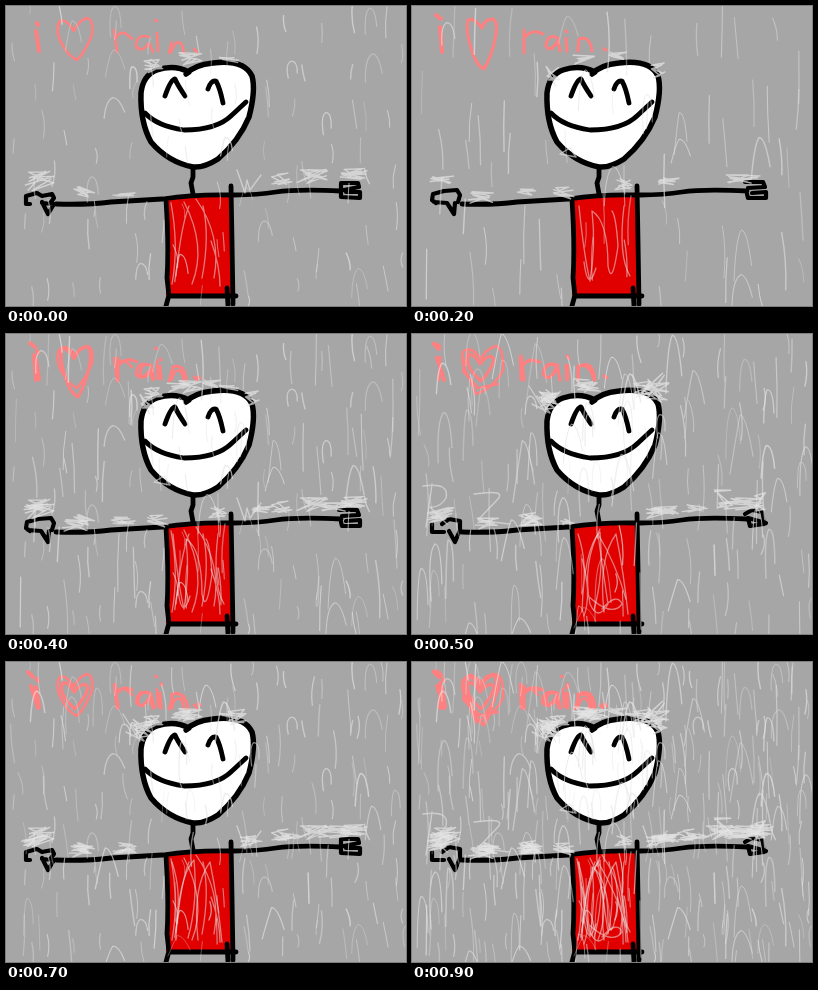
An HTML page with a canvas for the animation above (1 s loop, 400 by 300 pixels).

```html
<!DOCTYPE html>
<html lang="en">
<head>
<meta charset="utf-8">
<title>i love rain</title>
<style>
html, body { margin: 0; width: 100%; height: 100%; overflow: hidden; background: #a6a6a6; }
canvas { display: block; width: 400px; height: 300px; }
</style>
</head>
<body>
<canvas id="stage" width="400" height="300"></canvas>
<script>
const ctx = document.getElementById('stage').getContext('2d');
ctx.lineCap = ctx.lineJoin = 'round';

// Each sheet is one hand-drawn take of lettering, rain and splashes.
const sheets = [
  {
    seed: 11, cols: 15, rows: 7, min: 12, max: 31, arch: 0.12, penI: 4, pen: 2.6,
    dotted: 'M31 17l1 2M30 25L33 45',
    word: 'M68 25Q60 12 54 15Q48 24 56 38Q62 50 71 54Q79 46 86 29Q88 14 81 12Q73 14 68 25' +
      'M108 24L111 46M110 32Q115 21 126 33M143 31Q131 27 130 40Q135 48 143 37L147 46M149 14l2 1M151 27L152 45M163 47L166 36M165 46Q171 31 176 39L178 47M188 43l3 3',
    body: 'M165 197Q173 240 166 278M178 196Q201 240 186 278M190 193Q216 230 208 272M170 270Q175 220 183 200M196 272Q204 230 197 200M205 235Q214 260 214 280',
    extra: 'M231 164L239 187L241 174L244 184L255 169',
    splashes: [[148, 60, 20, 14], [184, 53, 25, 13], [222, 54, 25, 6], [33, 175, 32, 20], [78, 186, 22, 12], [119, 188, 24, 7], [276, 172, 22, 13], [307, 171, 32, 15], [346, 167, 30, 16]]
  },
  {
    seed: 29, cols: 15, rows: 6, min: 18, max: 42, arch: 0.2, penI: 4, pen: 3.2,
    dotted: 'M22 10L27 15M25 24L32 46',
    word: 'M68 30Q60 17 56 22Q53 33 69 47Q79 36 82 26Q79 17 68 30' +
      'M109 22L112 46M111 31Q117 23 126 28M144 31Q132 28 132 41Q138 49 145 32L148 46M155 22l1 1M154 31L155 46M166 46L166 32Q178 28 182 46M192 42l2 1',
    body: 'M170 278Q172 215 188 198Q192 240 182 276M192 278Q186 225 204 200Q212 240 216 280M166 200Q176 230 170 260',
    extra: 'M117 52L134 79M120 70L138 79L125 62',
    splashes: [[138, 66, 22, 22], [178, 53, 26, 10], [232, 55, 20, 16], [27, 179, 30, 14], [74, 190, 26, 12], [121, 186, 28, 11], [244, 179, 24, 12], [282, 174, 28, 9], [331, 169, 42, 14]]
  },
  {
    seed: 47, cols: 14, rows: 5, min: 22, max: 60, arch: 0.2, penI: 4, pen: 3,
    dotted: 'M24 9l5 4M28 21L30 46',
    word: 'M70 22Q61 11 56 14Q53 25 60 45Q64 59 72 63Q81 48 84 28Q86 14 80 13Q72 14 70 22' +
      'M112 24L112 47M112 32Q120 22 131 28M146 32Q135 27 134 40Q139 48 146 34L148 45M154 25l1 1M154 32L155 45M166 45L167 33Q178 29 180 45M192 43l2 1',
    body: 'M167 200Q172 250 178 275Q184 240 180 205Q196 215 196 260Q200 282 206 240Q204 210 200 205M212 200Q206 250 218 270M172 256Q176 288 184 262',
    extra: 'M148 148L164 151L158 142Z',
    splashes: [[141, 70, 14, 20], [172, 54, 22, 10], [206, 50, 20, 8], [246, 66, 14, 20], [29, 175, 25, 11], [69, 191, 26, 15], [115, 187, 22, 9], [151, 187, 22, 13], [212, 178, 20, 13], [257, 175, 22, 9], [331, 174, 34, 10]]
  },
  {
    seed: 83, cols: 15, rows: 5, min: 30, max: 66, arch: 0.5, penI: 2.8, pen: 2.6,
    dotted: 'M22 9l6 3M28 23L27 46',
    word: 'M69 25Q58 10 51 18Q48 29 58 46L64 60Q82 54 91 36Q92 15 84 12Q74 15 69 25M56 18L51 37L66 54L86 50' +
      'M108 23L109 46M109 33Q116 23 128 28M146 31Q132 26 131 40Q136 49 146 34L148 46M156 24l1 1M156 31L156 45M166 45L167 32Q181 25 183 45M193 43l2 1',
    body: 'M188 195Q170 230 178 270Q186 288 196 270Q190 230 186 200Q204 230 214 265M176 262Q200 284 210 270Q205 258 190 275M170 225Q180 260 172 282',
    extra: 'M20 150L14 193M11 152Q38 148 34 164Q28 174 18 173L35 190M62 160Q96 155 85 166L66 186L97 190',
    splashes: [[137, 64, 18, 23], [170, 50, 22, 12], [243, 55, 28, 32], [28, 184, 24, 12], [116, 185, 20, 13], [155, 188, 14, 7], [254, 176, 32, 10], [312, 165, 20, 20], [347, 167, 14, 20]]
  }
];

const steps = [[0], [1], [2], [3], [0, 2], [1, 3], [1, 2], [0, 1], [2, 3], [0, 1, 2, 3]];

const hands = [
  'M24 198L20 198L20 190L31 187L36 190L46 188L48 192L45 196M36 196L42 208L48 198L36 197M335 177L352 177L353 181L338 184M335 178L335 191L354 192L354 186L340 186',
  'M24 197L20 194L21 188L32 185L45 184L48 189L46 196M22 196L35 197L42 208L43 197M333 176L351 176L353 181L336 182M340 187L354 186L354 192L336 192L335 188',
  'M20 190L20 198L32 198M30 190L37 185L48 187L48 196L43 208L37 197M333 180L340 176L350 178L352 190L338 192L336 184L354 189'
];

const head = 'M180 68Q188 59 207 57Q238 53 246 70Q250 84 243 111Q233 135 212 153Q198 162 187 161Q162 156 145 136Q134 116 135 87Q137 69 151 64Q168 58 183 66Z';
const face = 'M139 107Q151 120 178 124Q211 124 226 109L240 96M159 90Q165 73 169 73Q171 78 179 90M202 83Q205 74 210 75Q214 82 217 97';
const frame = 'M157 193Q190 188 226 189M160 194Q163 240 161 272L163 290M163 289L160 300M225 180L226 235L227 298M163 290L230 290M221 282L222 300';
const arms = 'M187 162L187 171L185 177L187 188M50 198Q82 199 105 196L156 193M228 189Q252 189 270 186Q290 183 335 185';

function random(seed) {
  return () => {
    seed = (seed * 16807) % 2147483647;
    return seed / 2147483647;
  };
}

function stroke(path, color, width) {
  ctx.strokeStyle = color;
  ctx.lineWidth = width;
  ctx.stroke(new Path2D(path));
}

function drawPerson(step) {
  ctx.fillStyle = '#e00000';
  ctx.fillRect(160, 190, 67, 100);
  ctx.fillStyle = '#fff';
  ctx.fill(new Path2D(head));
  stroke(head, '#000', 5.5);
  stroke(face, '#000', 4.8);
  stroke(frame, '#000', 4.8);
  stroke(arms, '#000', 4.8);
  const pose = step === 2 || step === 4 ? 1 : step % 2 && step !== 7 ? 2 : 0;
  stroke(hands[pose], '#000', 4.2);
}

function drawRain(sheet) {
  const rnd = random(sheet.seed * 7919);
  const w = 397 / sheet.cols, h = 300 / sheet.rows;
  for (let row = 0; row < sheet.rows; row++) {
    for (let col = 0; col < sheet.cols; col++) {
      const x = 4 + (col + rnd()) * w;
      const y = (row + rnd()) * h - 10;
      const len = sheet.min + rnd() * (sheet.max - sheet.min);
      const lean = rnd() * 8 - 3;
      const bend = rnd() * 7 - 3;
      const arched = rnd() < sheet.arch;
      ctx.strokeStyle = `rgba(226,226,226,${0.3 + rnd() * 0.42})`;
      ctx.lineWidth = 0.9 + rnd() * 0.6;
      ctx.beginPath();
      if (arched) {
        ctx.moveTo(x - lean, y + len);
        ctx.quadraticCurveTo(x + bend, y + len * 0.15, x + 5, y);
        ctx.quadraticCurveTo(x + 11, y, x + 13 + lean, y + len * 0.7);
      } else {
        ctx.moveTo(x, y);
        ctx.quadraticCurveTo(x + lean / 2 + bend, y + len / 2, x + lean, y + len);
      }
      ctx.stroke();
    }
  }
}

function drawSplashes(sheet) {
  const rnd = random(sheet.seed * 104729);
  ctx.strokeStyle = 'rgba(228,228,228,.72)';
  ctx.lineWidth = 1.4;
  for (const [x, y, w, h] of sheet.splashes) {
    const turns = 7 + Math.round(w * h / 90);
    ctx.beginPath();
    for (let i = 0; i < turns; i++) {
      const side = i % 2 ? 0.5 : -0.5;
      ctx.lineTo(x + w * (side * (0.3 + rnd() * 0.7)), y + h * (rnd() - 0.5));
    }
    ctx.stroke();
  }
  stroke(sheet.extra, 'rgba(226,226,226,.65)', 1.4);
}

function draw(step) {
  ctx.fillStyle = '#a6a6a6';
  ctx.fillRect(0, 0, 400, 300);
  drawPerson(step);
  const shown = steps[step].map(i => sheets[i]);
  for (const sheet of shown) {
    stroke(sheet.dotted, '#ff8080', sheet.penI);
    stroke(sheet.word, '#ff8080', sheet.pen);
  }
  for (const sheet of shown) {
    drawRain(sheet);
    stroke(sheet.body, 'rgba(235,225,225,.55)', 1.3);
    drawSplashes(sheet);
  }
}

let last = -1;
const start = performance.now();
function tick() {
  const step = Math.floor(((performance.now() - start) % 1000) / 100);
  if (step !== last) draw(last = step);
  requestAnimationFrame(tick);
}
tick();
</script>
</body>
</html>
```
